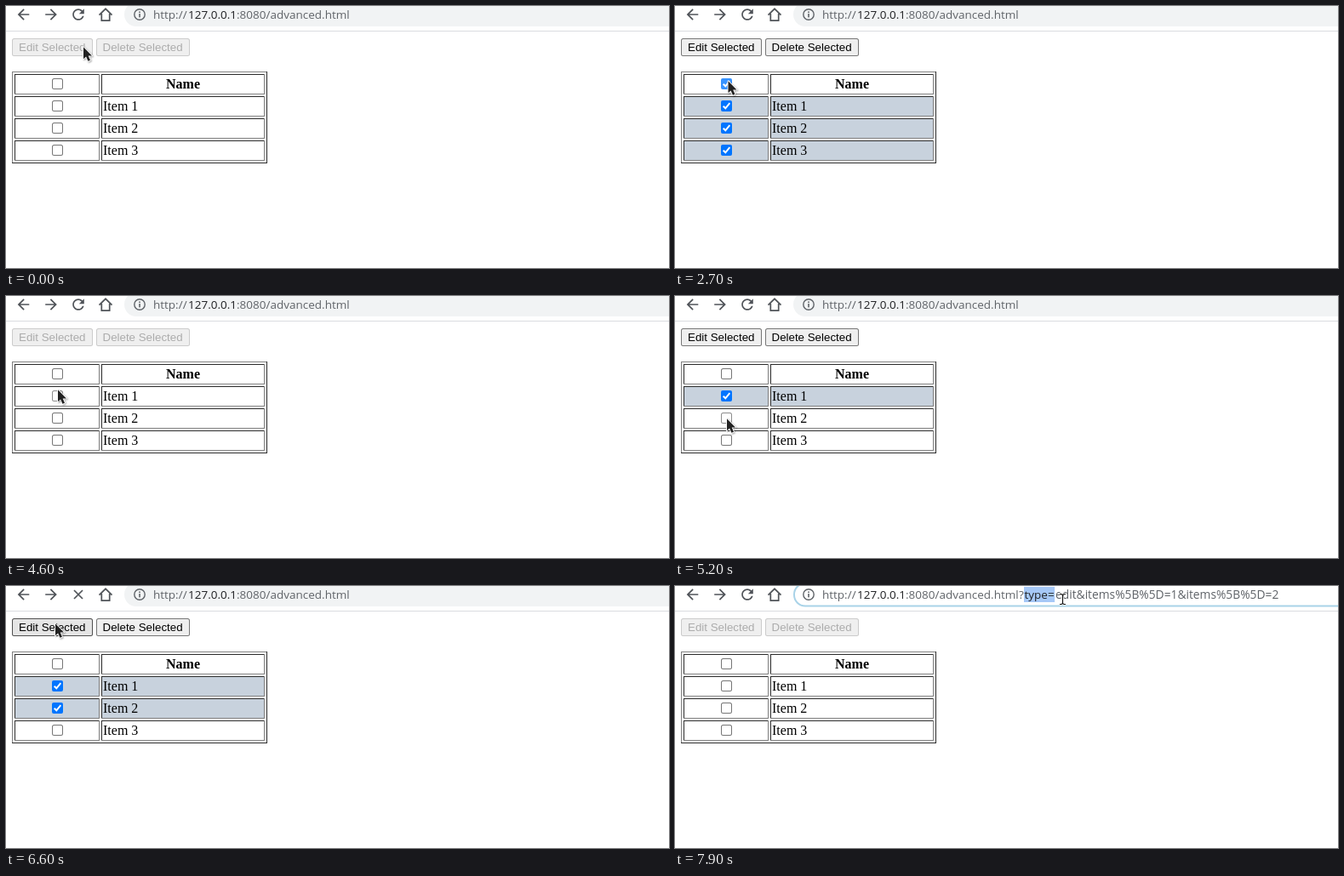
An HTML page with a canvas for the animation above (8 s loop, 779x308 px).

```html
<!DOCTYPE html>
<html lang="en">
<head>
<meta charset="utf-8">
<title>Item selection</title>
<style>
  html, body { margin: 0; width: 779px; height: 308px; overflow: hidden; background: #fff; }
  canvas { display: block; }
</style>
</head>
<body>
<canvas id="stage" width="779" height="308"></canvas>
<script>
const ctx = document.getElementById('stage').getContext('2d');
const LOOP = 8000, STEP = 100;
const UI = '"Open Sans", "Noto Sans", sans-serif';
const SANS = '13.333px "Liberation Sans", Arial, sans-serif';
const SERIF = '16px "Liberation Serif", "Times New Roman", serif';
const ICON = '#505459', GREY = '#5f6368', DARK = '#202124';

// pointer path: time, x, y
const PATH = [
  [600, 90, 48], [1000, 63, 86], [1200, 63, 86], [1300, 64, 85], [1600, 64, 85],
  [1700, 61.5, 88], [4200, 61.5, 88], [4400, 60, 110], [4700, 60, 110],
  [5100, 60, 144], [5400, 60, 144], [5500, 61, 134], [5700, 66, 91], [5800, 71, 67],
  [5900, 76, 54], [6000, 82, 46], [6100, 82, 46], [6200, 57, 44], [7000, 57, 44],
  [7400, 408, 13], [7500, 410, 14], [7900, 455, 15]
];

function pointer(t) {
  const i = PATH.findIndex(k => k[0] >= t);
  if (i === 0) return PATH[0].slice(1);
  if (i < 0) return PATH[PATH.length - 1].slice(1);
  const [t0, x0, y0] = PATH[i - 1], [t1, x1, y1] = PATH[i];
  const p = (t - t0) / (t1 - t0);
  return [x0 + (x1 - x0) * p, y0 + (y1 - y0) * p];
}

const within = (t, a, b) => t >= a && t < b;

function stateAt(t) {
  const [x, y] = pointer(t);
  const all = within(t, 2200, 2800) || within(t, 3400, 3900);
  const one = all || within(t, 4700, 6900);
  const two = all || within(t, 5300, 6900);
  return {
    x, y,
    checks: [all, one, two, all],
    pressed: [2700, 3300, 3800, 4600, 5200].includes(t),
    editPressed: t === 6500,
    loading: within(t, 6600, 6900),
    query: t >= 6900,
    focus: t >= 7500,
    selected: t >= 7500 ? Math.max(0, Math.min(5, Math.round((x - 410) / 9))) : 0
  };
}

function rect(x, y, w, h, color) {
  ctx.fillStyle = color;
  ctx.fillRect(x, y, w, h);
}

function text(str, x, y, font, color) {
  ctx.font = font;
  ctx.fillStyle = color;
  ctx.fillText(str, x, y);
}

function roundBox(x, y, w, h, r, fill, border) {
  ctx.beginPath();
  ctx.roundRect(x, y, w, h, r);
  ctx.fillStyle = border || fill;
  ctx.fill();
  if (!border) return;
  ctx.beginPath();
  ctx.roundRect(x + 1, y + 1, w - 2, h - 2, r - 1);
  ctx.fillStyle = fill;
  ctx.fill();
}

function line(d, color, width) {
  ctx.strokeStyle = color;
  ctx.lineWidth = width;
  ctx.stroke(new Path2D(d));
}

function icon(d, cx, cy, sx, sy) {
  ctx.save();
  ctx.translate(cx, cy);
  ctx.scale(sx, sy);
  ctx.translate(-12, -12);
  ctx.fillStyle = ICON;
  ctx.fill(new Path2D(d));
  ctx.restore();
}

const ARROW = 'M20 11H7.83l5.59-5.59L12 4l-8 8 8 8 1.41-1.41L7.83 13H20z';
const RELOAD = 'M17.65 6.35C16.2 4.9 14.21 4 12 4c-4.42 0-7.99 3.58-7.99 8s3.57 8 7.99 8c3.73 0 ' +
  '6.84-2.55 7.73-6h-2.08c-.82 2.33-3.04 4-5.65 4-3.31 0-6-2.69-6-6s2.69-6 6-6c1.66 0 ' +
  '3.14.69 4.22 1.78L13 11h7V4z';

function toolbar(s) {
  icon(ARROW, 20.5, 10, 0.85, 0.85);
  icon(ARROW, 53, 10, -0.85, 0.85);
  if (s.loading) line('M80 5L90 15M90 5L80 15', ICON, 1.7);
  else icon(RELOAD, 85, 10, 0.85, 0.85);
  line('M109.5 10.7L117 3.3L124.5 10.7M112.3 9V17.2H121.7V9', ICON, 1.7);

  roundBox(139, -4, 700, 28, 14, s.focus ? '#fff' : '#f1f3f4');
  if (s.focus) {
    ctx.beginPath();
    ctx.roundRect(140, -3, 698, 26.5, 13);
    ctx.strokeStyle = '#a9d3e8';
    ctx.lineWidth = 2;
    ctx.stroke();
  }
  ctx.beginPath();
  ctx.arc(157, 10, 6.2, 0, 7);
  ctx.strokeStyle = GREY;
  ctx.lineWidth = 1.4;
  ctx.stroke();
  rect(156.2, 9, 1.6, 4.4, GREY);
  rect(156.2, 6.4, 1.6, 1.6, GREY);
  url(s);
  rect(0, 29, 779, 1, '#dadce0');
}

function url(s) {
  const font = '13.5px ' + UI, base = 15;
  text('http://', 173, base, font, GREY);
  text('127.0.0.1', 214, base, font, DARK);
  text(':8080/advanced.html', 271, base, font, GREY);
  if (!s.query) return;
  const word = 'type=', left = 410.5;
  text('?', 404, base, font, GREY);
  text(word, left, base, font, GREY);
  text('edit&items%5B%5D=1&items%5B%5D=2', 447, base, '13.8px ' + UI, GREY);
  if (s.selected) {
    const part = word.slice(0, s.selected);
    ctx.font = font;
    const w = ctx.measureText(part).width;
    rect(410, 1, w + 1, 18, '#a6c8f7');
    text(part, left, base, font, DARK);
  }
}

function button(label, x, w, tx, on, s) {
  const over = s.x >= x && s.x < x + w && s.y >= 38 && s.y < 59;
  let fill = '#efefef', border = '#767676';
  if (!on) border = '#cbcbcb';
  else if (over && s.editPressed) { fill = '#f5f5f5'; border = '#8d8d8d'; }
  else if (over) { fill = '#e5e5e5'; border = '#4f4f4f'; }
  roundBox(x, 38, w, 21, 2.5, fill, border);
  text(label, tx, 53, SANS, on ? '#000' : '#acacac');
}

function bevel(x, y, w, h, topLeft, bottomRight) {
  rect(x, y, w, 1, topLeft);
  rect(x, y, 1, h, topLeft);
  rect(x, y + h - 1, w, 1, bottomRight);
  rect(x + w - 1, y, 1, h, bottomRight);
}

function checkbox(x, y, on, s) {
  const over = s.x >= x && s.x < x + 13 && s.y >= y - 1 && s.y < y + 13;
  const pick = (normal, hover, press) => !over ? normal : s.pressed ? press : hover;
  if (!on) {
    roundBox(x, y, 13, 13, 2.5, '#fff', pick('#767676', '#4f4f4f', '#8d8d8d'));
    return;
  }
  roundBox(x, y, 13, 13, 2, pick('#0075ff', '#005cc8', '#3793ff'));
  ctx.save();
  ctx.translate(x, y);
  line('M2.7 6.7L5.3 9.3L10.3 3.2', '#fff', 2);
  ctx.restore();
}

function table(s) {
  const dark = '#2c2c2c', light = '#808080';
  bevel(7, 77, 300, 108, light, dark);
  ['Name', 'Item 1', 'Item 2', 'Item 3'].forEach((label, i) => {
    const y = 80 + 26 * i, on = s.checks[i];
    for (const [x, w] of [[10, 100], [112, 192]]) {
      if (on && i) rect(x, y, w, 24, '#c8d2dd');
      bevel(x, y, w, 24, dark, light);
    }
    checkbox(54, y + 5, on, s);
    ctx.textAlign = i ? 'left' : 'center';
    text(label, i ? 114 : 208, y + 17, i ? SERIF : 'bold ' + SERIF, '#000');
  });
  ctx.textAlign = 'left';
}

function cursor(s) {
  ctx.save();
  ctx.translate(s.x, s.y);
  if (s.y < 24 && s.x > 139) {
    const beam = 'M-3 -5.5H-1L.5 -4.5L2 -5.5H4M.5 -4.5V5.5M-3 6.5H-1L.5 5.5L2 6.5H4';
    line(beam, '#fff', 2.6);
    line(beam, '#111', 1.2);
  } else {
    const arrow = new Path2D('M1 .3V14.2L4.1 11.4L6.4 16.8L9 15.7L6.7 10.4H11Z');
    ctx.lineJoin = 'round';
    ctx.strokeStyle = '#fff';
    ctx.lineWidth = 1.8;
    ctx.shadowColor = 'rgba(0,0,0,.35)';
    ctx.shadowBlur = 2;
    ctx.shadowOffsetX = ctx.shadowOffsetY = 1;
    ctx.stroke(arrow);
    ctx.shadowColor = 'transparent';
    ctx.fillStyle = '#222';
    ctx.fill(arrow);
  }
  ctx.restore();
}

function draw(t) {
  const s = stateAt(t);
  const any = s.checks.some(Boolean);
  rect(0, 0, 779, 308, '#fff');
  toolbar(s);
  button('Edit Selected', 7, 95, 15, any, s);
  button('Delete Selected', 106, 110, 113.5, any, s);
  table(s);
  cursor(s);
}

const start = performance.now();
function tick() {
  const t = (performance.now() - start) % LOOP;
  draw(Math.floor(t / STEP) * STEP);
  requestAnimationFrame(tick);
}
tick();
</script>
</body>
</html>
```
